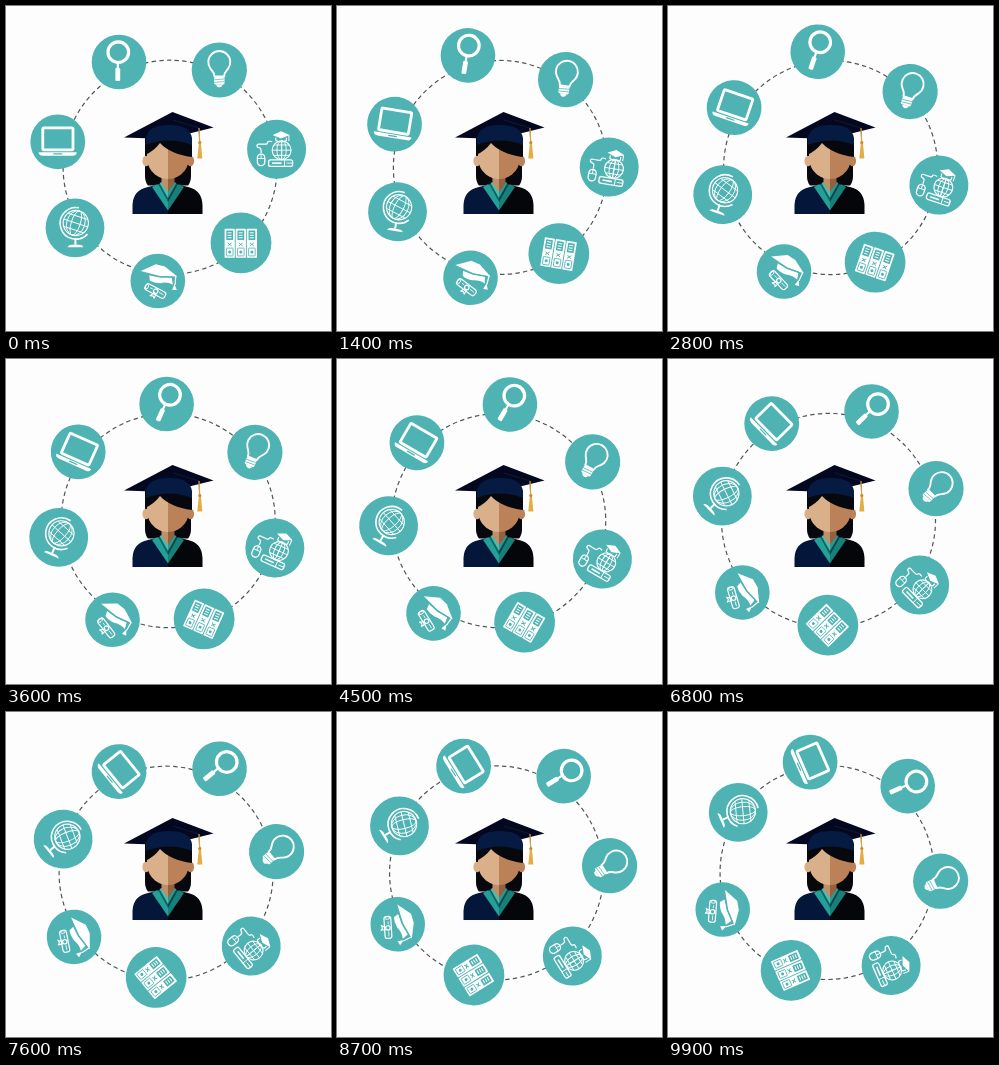
Write an HTML page with a canvas that moves like this. It is 325 px wide and 325 px high and loops after 10 s.

```html
<!DOCTYPE html>
<html lang="en">
<head>
<meta charset="utf-8">
<title>Graduate with turning study icons</title>
<style>
html, body { margin: 0; width: 100%; height: 100%; overflow: hidden; background: #fdfdfd; }
canvas { display: block; width: 325px; height: 325px; }
</style>
</head>
<body>
<canvas id="stage"></canvas>
<script>
const SIZE = 325, LOOP = 10000, STEP = 100, SPEED = 6.7; // degrees per second
const TEAL = '#4fb3b4', WHITE = '#fff';
const canvas = document.getElementById('stage');
const ctx = canvas.getContext('2d');
const dpr = window.devicePixelRatio || 1;
canvas.width = canvas.height = SIZE * dpr;

function paint(fill, stroke, width) {
  if (fill) { ctx.fillStyle = fill; ctx.fill(); }
  if (stroke) { ctx.strokeStyle = stroke; ctx.lineWidth = width; ctx.stroke(); }
}
function poly(points, fill, stroke, width) {
  ctx.beginPath();
  points.forEach(([x, y]) => ctx.lineTo(x, y));
  if (fill) ctx.closePath();
  paint(fill, stroke, width);
}
function oval(x, y, rx, ry, fill, stroke, width) {
  ctx.beginPath();
  ctx.ellipse(x, y, rx, ry, 0, 0, Math.PI * 2);
  paint(fill, stroke, width);
}
function box(x, y, w, h, r, fill, stroke, width) {
  ctx.beginPath();
  ctx.roundRect(x, y, w, h, r);
  paint(fill, stroke, width);
}
function shape(d, fill, stroke, width) {
  const p = new Path2D(d);
  if (fill) { ctx.fillStyle = fill; ctx.fill(p); }
  if (stroke) { ctx.strokeStyle = stroke; ctx.lineWidth = width; ctx.stroke(p); }
}
function turned(x, y, deg, draw) {
  ctx.save();
  ctx.translate(x, y);
  ctx.rotate(deg * Math.PI / 180);
  draw();
  ctx.restore();
}

function gridBall(x, y, r, tilt, meridians, line) {
  turned(x, y, tilt, () => {
    oval(0, 0, r, r, null, WHITE, line * 1.3);
    for (const k of meridians) oval(0, 0, r * k, r, null, WHITE, line);
    for (const k of [-0.55, 0, 0.55]) {
      const half = r * Math.sqrt(1 - k * k);
      poly([[-half, k * r], [half, k * r]], null, WHITE, line);
    }
  });
}

function magnifier() {
  oval(-0.7, -9.8, 10.3, 10.3, null, WHITE, 3.2);
  poly([[-1.2, 1], [-1.2, 7]], null, WHITE, 2.2);
  box(-3.6, 6, 4.8, 13, 1.2, WHITE);
}

function bulb() {
  shape('M-4.8 6.5 C-4.8 2.5 -7 1 -8.7 -1.2 A11 11 0 1 1 8.7 -1.2 C7 1 4.8 2.5 4.8 6.5 Z', null, WHITE, 1.9);
  box(-5.2, 7, 10.4, 7.5, 1.5, WHITE);
  poly([[-5, 9.8], [5, 9]], null, TEAL, 0.7);
  poly([[-5, 12.4], [5, 11.6]], null, TEAL, 0.7);
  shape('M-3.5 14.5 H3.5 Q2.5 17.3 0 17.3 Q-2.5 17.3 -3.5 14.5 Z', WHITE);
}

function elearning() {
  gridBall(5, 1, 9.4, 0, [0.5, 0.02], 0.9);
  poly([[-4, -14.2], [4.5, -18], [13, -14.2], [4.5, -10.6]], WHITE);
  shape('M-0.8 -11.8 V-8.6 Q4.5 -6 9.8 -8.6 V-11.8', null, WHITE, 1.1);
  poly([[12.3, -14], [12.3, -8]], null, WHITE, 1);
  shape('M-15.5 4 V1 Q-15.5 -1.5 -18 -1.5 Q-20 -2 -19.5 -4.2 Q-19 -5.5 -16 -5 H-11 Q-9 -5 -9 -7 Q-8.5 -8.5 -4.5 -7.5', null, WHITE, 1.2);
  box(-19.2, 5, 7.4, 11.5, 3.6, null, WHITE, 1.3);
  poly([[-19, 9.3], [-12, 9.3]], null, WHITE, 0.9);
  poly([[-15.5, 5], [-15.5, 9.3]], null, WHITE, 0.9);
  box(-8, 10.6, 24, 6.6, 2, null, WHITE, 1.3);
  poly([[-4.5, 13.9], [5, 13.9]], null, WHITE, 1.6);
  poly([[8, 11], [8, 17]], null, WHITE, 0.9);
  poly([[10, 13.9], [16, 13.9]], null, WHITE, 0.9);
}

function binders() {
  for (let i = 0; i < 3; i++) {
    const x = -16.4 + i * 11.1;
    box(x, -14, 10.2, 29, 0.6, WHITE);
    box(x + 1.7, -12.2, 6.8, 9.4, 0.4, TEAL);
    for (const y of [-10, -7.5, -5]) poly([[x + 3, y], [x + 7, y]], null, WHITE, 1);
    poly([[x + 3, 0], [x + 7, 3.2]], null, TEAL, 0.9);
    poly([[x + 7, 0], [x + 3, 3.2]], null, TEAL, 0.9);
    box(x + 1.8, 5.3, 6.6, 7.8, 0.5, null, TEAL, 0.8);
    oval(x + 5.1, 9.2, 1.5, 1.5, TEAL);
  }
}

function capAndScroll() {
  poly([[-17, -10], [-2, -16.8], [7, -14.5], [19.5, -4.5], [2, -5]], WHITE);
  shape('M-8.5 -5.8 L2 -3.4 L14 -3.2 L15 3.4 Q9 0.6 2.5 2.2 Q-4 2 -8 -0.5 Z', WHITE);
  poly([[-9, -6.6], [2, -4.2], [15, -4]], null, TEAL, 0.9);
  poly([[18, -5], [17.2, 4]], null, WHITE, 1.2);
  poly([[16.6, 3], [19, 9], [14.4, 9]], WHITE);
  turned(-2.5, 10, 28, () => {
    box(-11, -3.4, 22, 6.8, 2.4, null, WHITE, 1.2);
    oval(-9.4, 0, 1.3, 2.3, null, WHITE, 0.9);
    poly([[-6, -0.5], [-3, -0.5]], null, WHITE, 0.8);
    poly([[4, -0.5], [9, -0.5]], null, WHITE, 0.8);
    oval(0.5, 0, 2.2, 2.2, null, WHITE, 1.2);
    poly([[0, 2], [-2.4, 6.5], [0.4, 5.4], [2.4, 7], [2, 2]], null, WHITE, 1.1);
  });
}

function deskGlobe() {
  gridBall(0.8, -4.8, 12.6, 18, [0.72, 0.36], 0.9);
  shape('M4 -20 A15.8 15.8 0 1 0 12.5 6.3', null, WHITE, 1.6);
  poly([[0.4, 10.5], [0.4, 17]], null, WHITE, 2);
  shape('M-7.5 19.4 Q-6.5 17 -3 17 H4 Q7.5 17 8.5 19.4 Z', WHITE);
}

function laptop() {
  box(-15, -14, 30.2, 22, 1.2, null, WHITE, 2.8);
  shape('M-19 10.5 H18.8 V11.8 Q18 14 15 14 H-15 Q-18.2 14 -19 11.8 Z', WHITE);
  box(-4.5, 11.4, 9, 1.2, 0.5, TEAL);
}

const badges = [
  [113, 56, 27.3, magnifier], [213.3, 64, 27.6, bulb], [270.6, 143.2, 29.5, elearning],
  [235, 236.8, 30.4, binders], [151.8, 275, 27.3, capAndScroll],
  [69, 221.8, 29.4, deskGlobe], [51.8, 135.8, 27.4, laptop]
];

function about(x, y, deg, draw) {
  turned(x, y, deg, () => { ctx.translate(-x, -y); draw(); });
}

function wheel(deg) {
  about(162.1, 157, deg, () => {
    ctx.setLineDash([4.4, 3.3]);
    oval(164.1, 161.2, 107, 107, null, '#505557', 1.2);
    ctx.setLineDash([]);
  });
  about(162.5, 162, deg, () => {
    for (const [x, y, r, icon] of badges) {
      oval(x, y, r, r, TEAL);
      turned(x, y, 0, icon);
    }
  });
}

// Paints the drawing twice, once for each side of the middle line.
function halves(left, right, draw) {
  [[0, left], [162, right]].forEach(([x, color]) => {
    ctx.save();
    ctx.beginPath();
    ctx.rect(x, 0, x ? SIZE : 162, SIZE);
    ctx.clip();
    draw(color);
    ctx.restore();
  });
}

function graduate() {
  const hair = '#07080d';
  shape('M139 132 H185 V170 Q185 176 182 179.5 H142 Q139 176 139 170 Z', hair);
  halves('#04163a', '#050609', c =>
    shape('M126.5 208 V199 Q127 184 142 181 L154 178 H170 L182 181 Q196 184 196.5 199 V208 Z', c));
  halves('#23a097', '#187f79', c => shape('M150 178.5 L146 181 L162 204.5 L178 181 L174 178.5 Z', c));
  halves('#0f6468', '#0a474c', c => shape('M152 178 L162 196 L172 178 Z', c));
  halves('#4fbbad', '#2a9a90', c => shape('M153.5 177 L162 192 L170.5 177 L168 176 L162 184 L156 176 Z', c));
  halves('#bf8f68', '#94603f', c => shape('M155.5 166 H168.5 V177 L162 186 L155.5 177 Z', c));
  halves('#dab08a', '#bb8159', c => {
    oval(140, 155, 3.6, 5.2, c);
    oval(184.5, 155, 3.6, 5.2, c);
    shape('M141 135 H183 V153 Q182 163 175 168.5 Q169 173 162 173 Q155 173 149 168.5 Q142 163 141 153 Z', c);
  });
  shape('M139 149 V132 H186 V151 Q164 148 154 137 Q148 145 139 149 Z', hair);
  poly([[118, 131.5], [166.5, 106], [207.5, 121.5], [161, 133]], '#030820');
  shape('M140 139 V132 Q142 119 163 119 Q184 119 186 132 V139 Q175 134.5 163 134.5 Q151 134.5 140 139 Z', '#051b42');
  poly([[167, 114], [193, 122], [193.7, 136]], null, '#1a2038', 0.7);
  poly([[193, 122], [193.7, 137]], null, '#dca43d', 1.2);
  poly([[193, 136], [194.8, 136], [196.4, 152.5], [191.3, 152.5]], '#e3ad45');
  oval(193.8, 136.5, 1.6, 1.6, '#c98c2e');
}

function frame(now) {
  const t = Math.floor((now % LOOP) / STEP) * STEP;
  ctx.setTransform(dpr, 0, 0, dpr, 0, 0);
  ctx.fillStyle = '#fdfdfd';
  ctx.fillRect(0, 0, SIZE, SIZE);
  ctx.lineJoin = 'round';
  wheel(SPEED * t / 1000);
  graduate();
}

let start;
function tick(now) {
  if (start === undefined) start = now;
  frame(now - start);
  requestAnimationFrame(tick);
}
frame(0);
requestAnimationFrame(tick);
</script>
</body>
</html>
```
